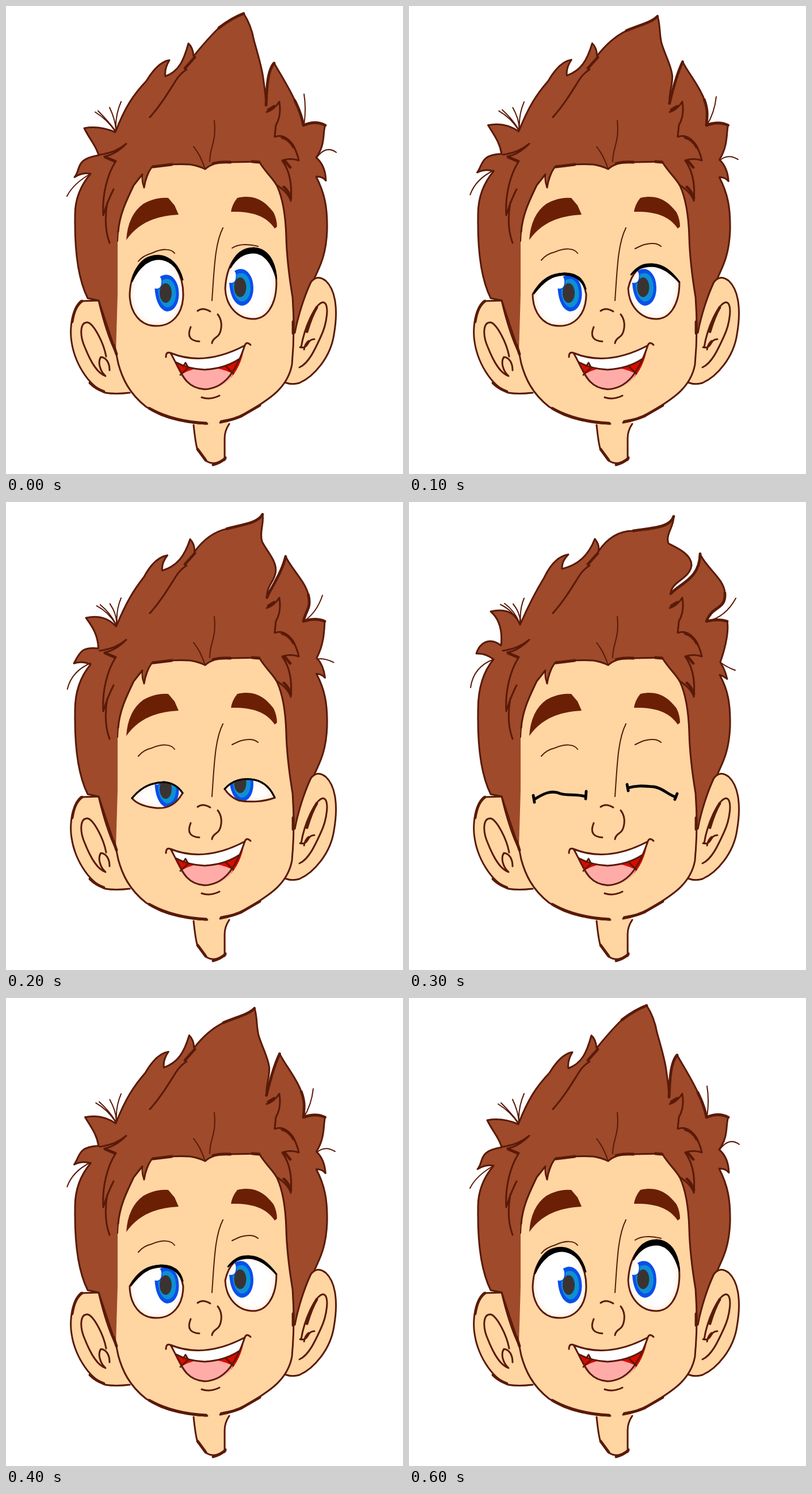
Recreate the animation shown at these times as an HTML page. Size 690x812 px, loop 0.67 s.

```html
<!DOCTYPE html>
<html lang="en">
<head>
<meta charset="utf-8">
<title>Blinking boy</title>
<style>
html, body { margin: 0; width: 100%; height: 100%; overflow: hidden; background: #fff; }
svg { display: block; }
.ink { fill: none; stroke: #5a1a08; stroke-width: 3; stroke-linecap: round; stroke-linejoin: round; }
.thin { stroke-width: 2; }
.bold { stroke-width: 4.8; }
.skin { fill: #ffd5a2; }
.blush { fill: none; stroke: #ffeada; stroke-width: 8; filter: blur(4px); }
</style>
</head>
<body>
<svg width="690" height="812" viewBox="0 0 690 812">
  <defs>
    <clipPath id="eyes"><path class="eye"/></clipPath>
  </defs>

  <!-- neck -->
  <path class="skin" d="M326 715 C327 740 329 756 332 767 L349 790 Q364 799 382 784 L381 745 L388 715Z"/>
  <path class="ink" d="M326 727 C328 745 329 756 332 767 L349 790 Q364 799 382 783 M388 725 Q380 737 380 750 L380 788"/>
  <path class="ink bold" d="M333 769 L347 788 M360 796 Q372 793 381 785"/>

  <path id="hair" class="ink" style="fill:#9e4a2b"/>

  <!-- ears -->
  <path class="skin" d="M161 511 L130 512 C118 522 111 550 113 575 C117 618 143 658 172 671 L215 672 L200 600 L192 604 C180 580 169 545 161 511Z
    M530 479 Q541 465 556 477 C574 494 577 530 570 570 C564 610 535 643 510 654 Q498 658 470 650 L500 570 C507 535 520 500 530 479Z"/>
  <path class="ink" d="M192 604 C180 580 169 545 161 511 L130 512 C118 522 111 550 113 575 C117 618 143 658 172 671 Q190 674 215 671
    M502 567 C508 535 520 500 530 479 Q541 465 556 477 C574 494 577 530 570 570 C564 610 535 643 510 654 Q498 658 484 653
    M174 608 C170 585 153 552 142 549 C128 548 128 572 137 592 C147 617 158 637 173 642 C163 633 159 617 165 609 C175 610 180 620 180 632
    M513 592 C518 560 537 516 551 514 C563 515 558 551 547 574 C537 596 526 620 510 627 M536 578 C522 578 527 596 511 592 M526 581 Q520 585 518 596"/>
  <path class="ink bold" d="M132 512 Q119 521 115 548 M146 654 Q156 664 170 669 M523 565 Q531 538 540 523"/>

  <!-- face -->
  <path class="skin" d="M346 283 Q362 269 390 271 L440 270 C451 289 463 297 471 312 C482 336 486 365 487 400 C488 440 493 475 498 505 C501 545 500 590 497 622 C488 672 440 690 410 712 Q393 719 372 723 L350 725 C310 724 275 715 243 695 C214 672 202 646 195 620 L191 600 L194 500 L194 410 C197 365 209 338 222 311 L238 291 L240 315 L252 280 Q280 273 320 275Z"/>
  <path class="ink" d="M195 392 C197 363 209 338 222 311 L237 292 Q236 304 240 315 Q243 294 253 280 Q285 273 320 275 Q334 277 346 283 Q362 269 390 271 L440 270 C451 289 463 297 471 312 C482 336 486 365 487 400 C488 440 493 475 498 505 C501 545 500 590 497 622 C488 672 440 690 410 712 Q393 719 372 723
    M350 725 C310 724 275 715 243 695 C214 672 202 646 195 620 L191 600"/>
  <path class="ink bold" d="M348 724 C310 722 277 714 249 698 Q278 716 318 721 M374 721 Q400 717 415 708 L441 693 M499 548 L499 568 M255 279 L288 275 M360 273 Q375 270 390 271 M428 270 L440 271 M187 588 L192 604"/>

  <!-- strands inside the hair -->
  <path class="ink" d="M250 193 C269 172 282 150 296 128 Q302 118 314 110
    M209 239 Q190 255 163 258 M209 239 Q190 258 171 261 L191 269 C176 292 167 327 169 363 Q177 337 187 318 M176 341 Q169 382 180 411
    M453 184 Q466 180 475 166 Q479 190 469 207 L467 227 C486 220 502 238 509 268 Q494 263 480 268 Q499 294 495 338 Q491 324 471 311"/>
  <path class="ink thin" d="M362 199 C366 238 354 244 354 270 M326 244 Q338 259 345 280 M194 408 L195 388"/>
  <path class="ink bold" d="M311 108 L328 89 M456 180 L466 174 M480 228 Q493 232 500 245 M172 262 L188 269 M483 314 Q491 321 495 333 M484 268 L494 280"/>
  <path class="ink thin" id="wisps"/>
  <path class="ink bold" id="crestInk"/>
  <path class="ink bold" id="sideInk"/>

  <!-- brows, nose -->
  <path fill="#6b1f05" d="M209 406 Q212 362 239 343 Q261 331 282 333 L293 346 L300 362 C263 364 232 374 209 406Z
    M391 357 Q393 344 402 333 C433 326 450 339 465 358 Q471 370 471 383 L467 386 C452 363 425 356 391 357Z"/>
  <path class="ink thin" id="creases"/>
  <path class="ink thin" d="M377 385 C363 412 362 455 358 511"/>
  <path class="ink" d="M333 529 Q342 522 355 530 M368 535 C379 549 374 570 365 575 Q359 579 358 585 M321 557 C314 574 321 581 336 582"/>

  <!-- mouth -->
  <path fill="#dc0a00" d="M286 602 Q345 626 415 589 C406 645 375 665 345 665 C309 662 305 635 286 602Z"/>
  <path fill="#ffaca8" d="M303 640 Q345 615 395 638 C384 659 362 665 345 665 Q317 662 303 640Z"/>
  <path fill="#fff" d="M286 602 Q345 626 415 589 Q413 604 406 612 Q381 629 345 631 Q318 630 295 618Z"/>
  <path class="ink" d="M278 609 Q278 599 286 602 Q345 626 415 589 Q418 581 425 588 M286 602 C305 635 309 662 345 665 C378 664 399 637 415 589
    M295 618 Q318 630 345 631 Q381 629 406 612 M303 640 L316 628 M383 626 L395 638 M308 625 L312 619 L317 628 M340 679 Q355 684 371 676"/>

  <!-- eyes -->
  <path class="eye" fill="#fff"/>
  <g clip-path="url(#eyes)">
    <path class="eye blush"/>
    <g id="iris" transform="translate(-1.5)">
      <path fill="#0a4fea" d="M269 470 C284 459 302 473 302 499 C302 518 293 530 281 530 C267 527 261 508 260 490 Q269 492 271 484 Q273 474 269 470Z"/>
      <path fill="#0c90d4" d="M273 476 C286 468 297 480 297 499 C297 514 290 523 281 523 C272 520 266 508 266 492 Q275 490 273 476Z"/>
      <ellipse cx="279" cy="498" rx="10.5" ry="17" fill="#3a3332"/>
    </g>
    <use href="#iris" x="129.5" y="-10"/>
  </g>
  <path class="ink eye"/>
  <path id="lids" stroke="#000" stroke-linecap="round" stroke-linejoin="round"/>
</svg>
<script>
const $ = id => document.getElementById(id);
const set = (id, d) => $(id).setAttribute("d", d);

// Blend two paths that share the same commands.
function mix(a, b, k) {
  const to = b.match(/-?[\d.]+/g);
  let i = 0;
  return a.replace(/-?[\d.]+/g, n => +n + (to[i++] - n) * k);
}

// How far each part is blown over in the four poses.
const even = [0, .32, .64, 1], lead = [0, .4, .7, 1], lag = [0, .24, .5, 1];

const hair = [
  [lag,
    "M230 600 L192 604 L161 511 L142 507 C126 475 119 430 120 365 Q119 324 147 291 Q133 288 119 297 C131 284 118 266 161 259 C157 243 145 231 136 212 Q162 207 190 219 C207 175 222 153 244 130 Q264 97 284 94 Q275 109 277 122 C301 113 309 94 317 65 Q325 72 326 87",
    "M230 600 L192 604 L161 511 L142 507 C126 475 119 430 120 365 Q119 306 147 273 Q133 262 117 263 C124 241 143 235 160 249 C163 220 156 202 142 190 Q180 181 193 213 C210 174 222 152 235 131 Q252 95 277 91 Q265 103 266 116 C295 109 312 92 323 64 Q332 75 329 86"],
  [lead,
    "C340 70 352 55 370 38 C388 24 400 18 413 13 C421 25 428 43 431 60",
    "C345 62 365 50 390 50 C425 45 454 44 460 25 C461 42 445 57 451 72"],
  [lag,
    "C439 88 445 108 447 125 C449 140 451 150 452 172 C453 152 453 113 466 99 C479 122 492 142 502 164 C511 182 515 196 517 207",
    "C465 79 492 91 491 110 C488 134 455 138 455 159 C471 141 505 134 506 90 C515 113 548 133 549 158 C551 188 527 179 517 207"],
  [lag,
    "Q538 198 555 207 C550 218 556 241 539 263 Q555 276 556 303 Q550 295 539 296 C554 325 559 350 558 390 C556 440 541 458 535 476 L502 570 L450 570 L450 400 L230 400Z",
    "Q538 202 553 207 C556 222 551 250 541 278 Q549 290 553 307 Q547 302 540 300 C554 325 559 350 558 390 C556 440 541 458 535 476 L502 570 L450 570 L450 400 L230 400Z"]
];

const wisps = [
  "M190 218 Q176 197 155 184 M190 216 Q177 199 160 182 M191 215 Q190 197 180 176 M191 213 Q190 189 200 166 M147 291 Q117 308 106 330 M518 206 Q522 178 518 153 M540 263 Q556 241 574 254",
  "M192 210 Q179 187 159 178 M192 210 Q184 189 166 176 M193 209 Q194 193 181 177 M194 209 Q192 186 200 167 M147 273 Q112 286 107 322 M518 207 Q550 200 568 167 M541 278 Q551 286 567 292"
];
const crestInk = [
  "M370 38 C388 24 400 18 413 13",
  "M390 50 C425 45 454 44 460 25"
];
const sideInk = [
  "M452 172 C453 152 453 113 466 99 M502 164 C511 182 515 196 517 207 Q538 198 555 207",
  "M455 159 C471 141 505 134 506 90 M549 158 C551 188 527 179 517 207 Q538 202 553 207"
];

// Per pose: the opening of both eyes, then both lids and their weight.
const lower = [
  "M215 500 C215 530 232 556 262 555 C288 555 308 535 308 500 ",
  "M381 490 C382 520 402 543 430 543 C452 543 470 520 470 480 "
];
const eyes = [
  lower[0] + "C308 468 290 434 265 434 C238 434 217 457 215 500Z" + lower[1] + "C470 449 457 421 430 420 C399 422 383 453 381 490Z",
  lower[0] + "C303 474 292 464 270 464 C246 465 229 475 215 500Z" + lower[1] + "C456 460 441 449 422 448 C402 449 387 462 381 490Z",
  "M219 514 C237 492 255 487 275 486 Q296 488 307 505 C295 526 280 532 262 531 Q231 528 219 514Z M380 498 C394 482 410 480 425 481 C448 483 460 497 467 513 C447 521 420 521 405 518 Q389 512 380 498Z",
  ""
];
const lids = [
  "M219 478 C229 440 247 433 265 433 C286 434 301 451 307 475 C296 449 283 440 265 439 C247 440 230 453 219 478Z M390 454 C398 430 411 420 431 420 C455 422 467 442 470 473 C462 444 448 429 431 428 C412 428 400 438 390 454Z",
  "M217 499 C231 473 247 465 270 464 C291 464 303 474 307 491 C299 474 289 467 270 466 C247 467 233 478 217 499Z M386 466 C398 451 409 447 422 448 C443 449 455 460 470 479 C454 463 441 452 422 451 C407 451 397 456 386 466Z",
  "M219 514 C237 492 255 487 275 486 Q296 488 307 505 M380 498 C394 482 410 480 425 481 C448 483 460 497 467 513",
  "M218 516 C236 504 249 500 263 506 C277 510 290 506 307 511 M216 509 L218 521 M308 502 L307 515 M381 496 C396 491 410 493 425 494 C441 496 450 508 464 512 M379 490 L381 501 M466 506 L462 516"
];
const lidWeight = [2.6, 2.8, 3, 4.8];
const creases = [
  "M230 443 Q238 433 253 429 C272 420 287 421 293 429 M393 420 Q408 410 438 417",
  "M230 441 Q239 430 253 427 C272 419 287 420 293 429 M393 421 Q405 415 409 414 Q429 409 438 417"
];

function draw(pose) {
  set("hair", hair.map(([w, a, b]) => mix(a, b, w[pose])).join(" "));
  set("wisps", mix(...wisps, even[pose]));
  set("crestInk", mix(...crestInk, lead[pose]));
  set("sideInk", mix(...sideInk, lag[pose]));
  set("creases", creases[Math.min(pose, 1)]);
  for (const e of document.querySelectorAll(".eye")) e.setAttribute("d", eyes[pose]);
  set("lids", lids[pose]);
  $("lids").setAttribute("fill", pose < 2 ? "#000" : "none");
  $("lids").setAttribute("stroke-width", lidWeight[pose]);
}

const order = [0, 1, 2, 3, 1, 0];
let shown = -1;
function tick() {
  const pose = order[Math.min(5, Math.floor(performance.now() % 670 / 100))];
  if (pose !== shown) draw(shown = pose);
  requestAnimationFrame(tick);
}
tick();
</script>
</body>
</html>
```
